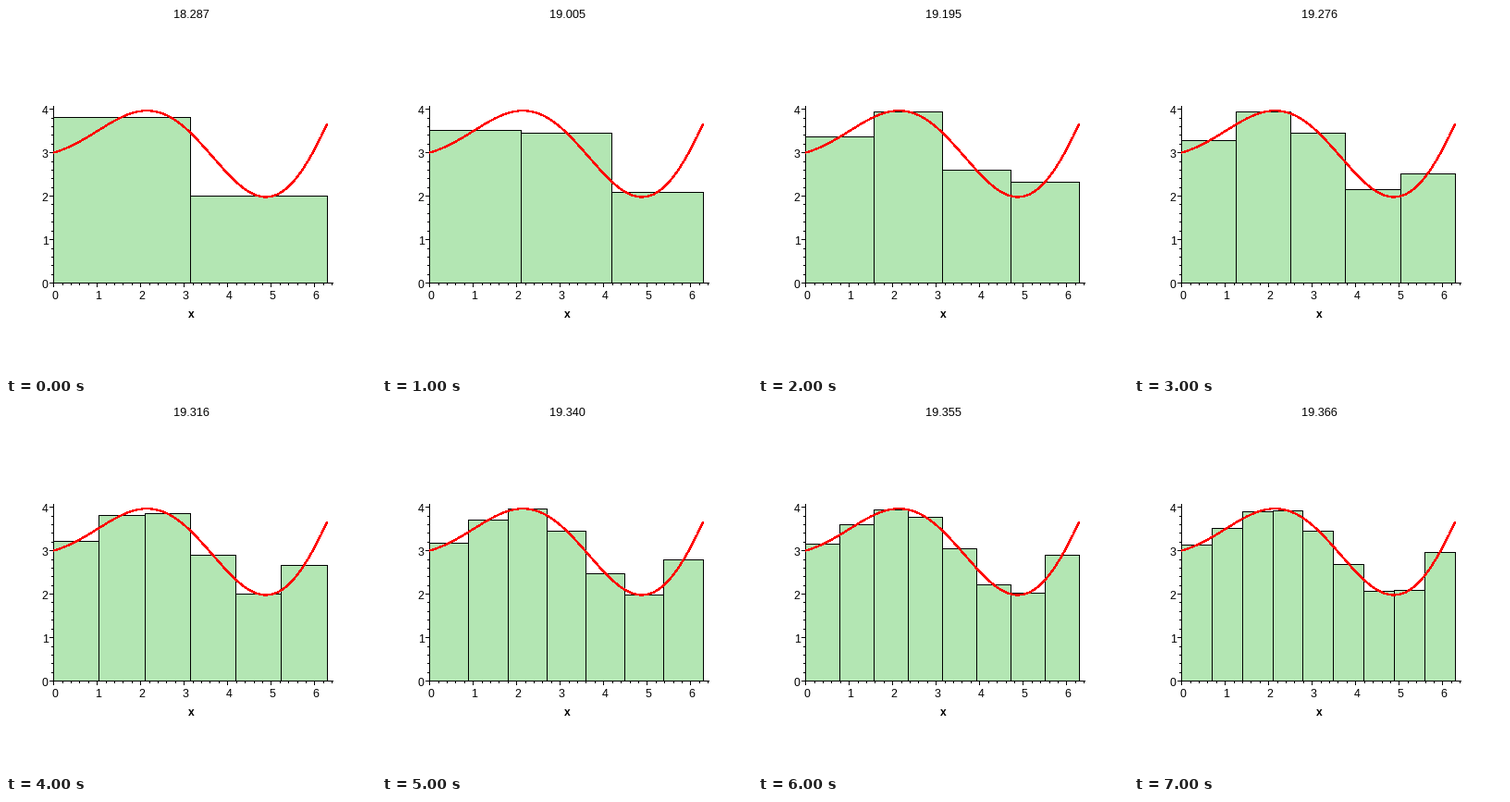
A matplotlib script for the animation above (8000 ms loop, 400x400 px).

```python
import numpy as np
import matplotlib.pyplot as plt
from matplotlib.animation import FuncAnimation
from matplotlib.patches import Rectangle

SIZE, DPI = 400, 100
PX = 72 / DPI                      # one pixel in points
X0, Y0 = 51.5, 299.5               # origin of the plot in pixels
SX, SY = 47.05, 47.0               # pixels per unit
END = 2 * np.pi
GREEN = "#b3e6b3"
SUMS = ["18.287", "19.005", "19.195", "19.276",
        "19.316", "19.340", "19.355", "19.366"]


def f(x):
    return 3 + x * np.sin(x) / 3 + 0.3736 * np.log(1 + x / 1.3)


def px(x):
    return X0 + SX * x


def py(y):
    return Y0 - SY * y


def snap(v):
    """Move a coordinate to the centre of its pixel."""
    return np.floor(v + 0.1) + 0.5


fig = plt.figure(figsize=(SIZE / DPI, SIZE / DPI), dpi=DPI, facecolor="white")
ax = fig.add_axes([0, 0, 1, 1])
ax.set_xlim(0, SIZE)
ax.set_ylim(SIZE, 0)
ax.axis("off")


def line(xs, ys, color="black", width=1, cap="projecting", z=3):
    ax.plot(xs, ys, color=color, lw=width * PX, antialiased=False,
            snap=False, solid_capstyle=cap, zorder=z)


def label(x, baseline, text, size=12.4, weight="normal"):
    return ax.text(x, baseline, text, fontsize=size * PX, ha="center",
                   va="baseline", family="Liberation Sans", weight=weight)


def draw_axes():
    line([X0, X0], [108.5, Y0])
    line([X0, 353.5], [Y0, Y0])
    for i in range(33):
        x = snap(px(i / 5))
        line([x, x], [Y0, Y0 + (4 if i % 5 == 0 else 2)])
    for i in range(21):
        y = snap(py(i / 5))
        line([X0 - (4 if i % 5 == 0 else 2), X0], [y, y])
    for i in range(7):
        label(px(i) + 1.5, 317, str(i))
    for i in range(5):
        label(42.3, py(i) + 5.5, str(i))
    label(200, 337, "x", 12, "bold")


draw_axes()
xs = np.linspace(0, END, 200)
line(px(xs), py(f(xs)), "red", 1.2, "butt", 4)
title = label(200.7, 13, "", 12.8)
bars = [ax.add_patch(Rectangle((0, 0), 0, 0, fc=GREEN, ec="black", lw=PX,
                               antialiased=False, snap=False,
                               joinstyle="miter", zorder=2))
        for _ in range(9)]


def update(i):
    n = i + 2
    edges = snap(px(np.linspace(0, END, n + 1)))
    tops = snap(py(f((np.arange(n) + 0.5) * END / n)))
    for k, bar in enumerate(bars):
        bar.set_visible(k < n)
        if k < n:
            bar.set_bounds(edges[k], tops[k], edges[k + 1] - edges[k], Y0 - tops[k])
    title.set_text(SUMS[i])
    return bars + [title]


anim = FuncAnimation(fig, update, frames=8, interval=1000, repeat=True,
                     repeat_delay=0, blit=False)
plt.show()
```
